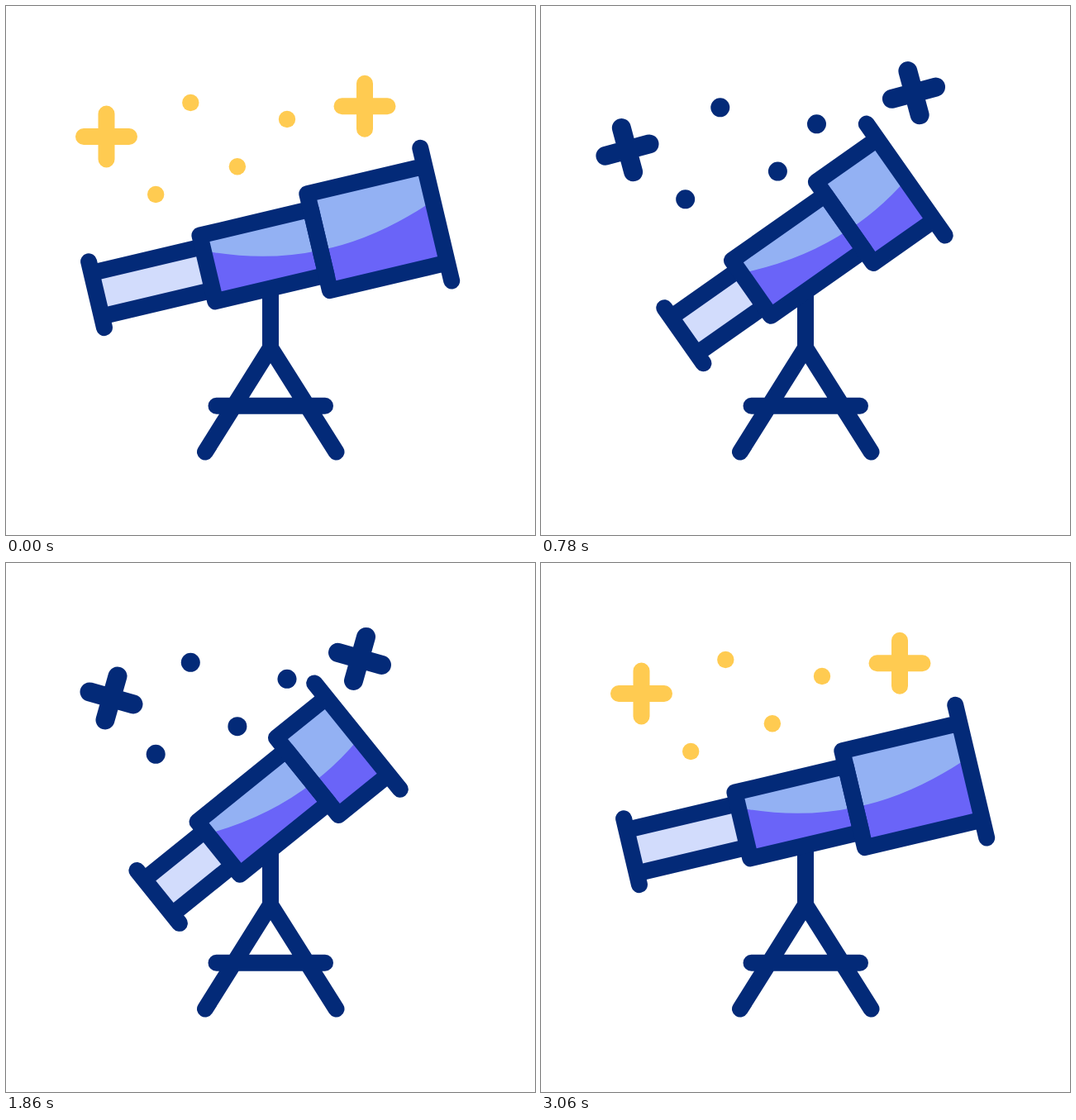
An HTML page for the animation above (3600 ms loop, 640 by 640 pixels).

```html
<!DOCTYPE html>
<html lang="en">
<head>
<meta charset="utf-8">
<title>Telescope</title>
<style>
  html, body { margin: 0; width: 100%; height: 100%; overflow: hidden; background: #fff; }
  svg { display: block; width: 100%; height: 100%; }
  .line { fill: none; stroke: #032a78; stroke-width: 20; stroke-linecap: round; stroke-linejoin: round; }
</style>
</head>
<body>
<svg viewBox="0 0 640 640">
  <defs>
    <clipPath id="lens"><rect id="lensBox" x="69" y="-60" height="120"/></clipPath>
  </defs>
  <g id="sky"></g>
  <path class="line" d="M320 342V413.5M241 539.5L320 413.5L399.5 539.5M254.5 483.8H386"/>
  <g id="scope">
    <rect id="eyeFill" y="-27" height="54" fill="#d2dcfc"/>
    <path id="eyeLine" class="line"/>
    <rect x="-69" y="-41" width="138" height="82" fill="#93b1f3"/>
    <path d="M-69 -22Q0 8.5 69 10V41H-69Z" fill="#6a64f8"/>
    <g clip-path="url(#lens)">
      <rect x="69" y="-60" width="150" height="120" fill="#93b1f3"/>
      <path d="M69 10Q140 12.5 219 -18.5V60H69Z" fill="#6a64f8"/>
    </g>
    <rect class="line" x="-69" y="-41" width="138" height="82"/>
    <path id="lensLine" class="line"/>
  </g>
</svg>
<script>
const LOOP = 3600, BLINK = 612;
const YELLOW = '#ffcb51', NAVY = '#032a78';
const $ = id => document.getElementById(id);

// Eased progress from 0 to 1 between two times
function ramp(t, from, to) {
  const u = Math.min(1, Math.max(0, (t - from) / (to - from)));
  return (1 - Math.cos(Math.PI * u)) / 2;
}

// Dip, swing up, settle, return
const tilt = t => -13.3 + 25.9 * ramp(t, 0, 410) - 50.2 * ramp(t, 428, 840)
                - 1.3 * ramp(t, 840, 1860) + 25.6 * ramp(t, 1880, 2800);

// How far the tubes are pushed in, 0 to 1
const pushed = (t, shut, open) => ramp(t, 480, shut) - ramp(t, 1880, open);

const starX = t => 17.2 * ramp(t, 250, 820) - 29 * ramp(t, 820, 1430) + 11.8 * ramp(t, 1430, 2300);
const starY = t => 26.5 * (ramp(t, 900, 2270) - ramp(t, 280, 1160));
const starTurn = t => -15.4 * ramp(t, 0, 860) + 31.7 * ramp(t, 1053, 1930) - 16.3 * ramp(t, 1930, 2980);
const dotX = t => 7.1 * (ramp(t, 0, 960) - ramp(t, 950, 1860));
const dotY = t => 7 * (ramp(t, 0, 1080) - ramp(t, 1080, 2600));

function add(tag, attrs) {
  const el = document.createElementNS('http://www.w3.org/2000/svg', tag);
  for (const name in attrs) el.setAttribute(name, attrs[name]);
  return $('sky').appendChild(el);
}

// dir is the sign of each part's drift
const part = (x, y, dir, tag, attrs) => ({ x, y, dir, el: add(tag, attrs) });
const cross = { d: 'M-27.5 0H27.5M0 -27.5V27.5', 'stroke-linecap': 'round' };
const disc = { stroke: 'none' };
const stars = [
  part(121.5, 158, -1, 'path', cross),
  part(434, 121.3, 1, 'path', cross)
];
const dots = [
  part(223.3, 117, -1, 'circle', disc),
  part(340, 137, -1, 'circle', disc),
  part(279.9, 194.3, 1, 'circle', disc),
  part(181.2, 228, -1, 'circle', disc)
];

function draw(t) {
  const eye = 207 - 44 * pushed(t, 875, 2900);
  const lens = 215 - 68.5 * pushed(t, 900, 2800);
  $('scope').setAttribute('transform', `translate(311 301.6) rotate(${tilt(t)})`);
  $('eyeFill').setAttribute('x', -eye);
  $('eyeFill').setAttribute('width', eye - 69);
  $('eyeLine').setAttribute('d', `M${-eye} -41V41M${-eye} -27H-69M${-eye} 27H-69`);
  $('lensBox').setAttribute('width', lens - 69);
  $('lensLine').setAttribute('d', `M${lens} -60H69V60H${lens}M${lens} -82.5V82.5`);

  const dark = t < 5 * BLINK && Math.floor(t / BLINK) % 2 === 1;
  $('sky').setAttribute('fill', dark ? NAVY : YELLOW);
  $('sky').setAttribute('stroke', dark ? NAVY : YELLOW);
  for (const { x, y, dir, el } of stars) {
    el.setAttribute('stroke-width', dark ? 23 : 20);
    el.setAttribute('transform',
      `translate(${x + dir * starX(t)} ${y + dir * starY(t)}) rotate(${starTurn(t)})`);
  }
  for (const { x, y, dir, el } of dots) {
    el.setAttribute('r', dark ? 11.5 : 10.2);
    el.setAttribute('cx', x + dir * dotX(t));
    el.setAttribute('cy', y + dotY(t));
  }
}

const start = performance.now();
function frame() {
  draw((performance.now() - start) % LOOP);
  requestAnimationFrame(frame);
}
frame();
</script>
</body>
</html>
```
